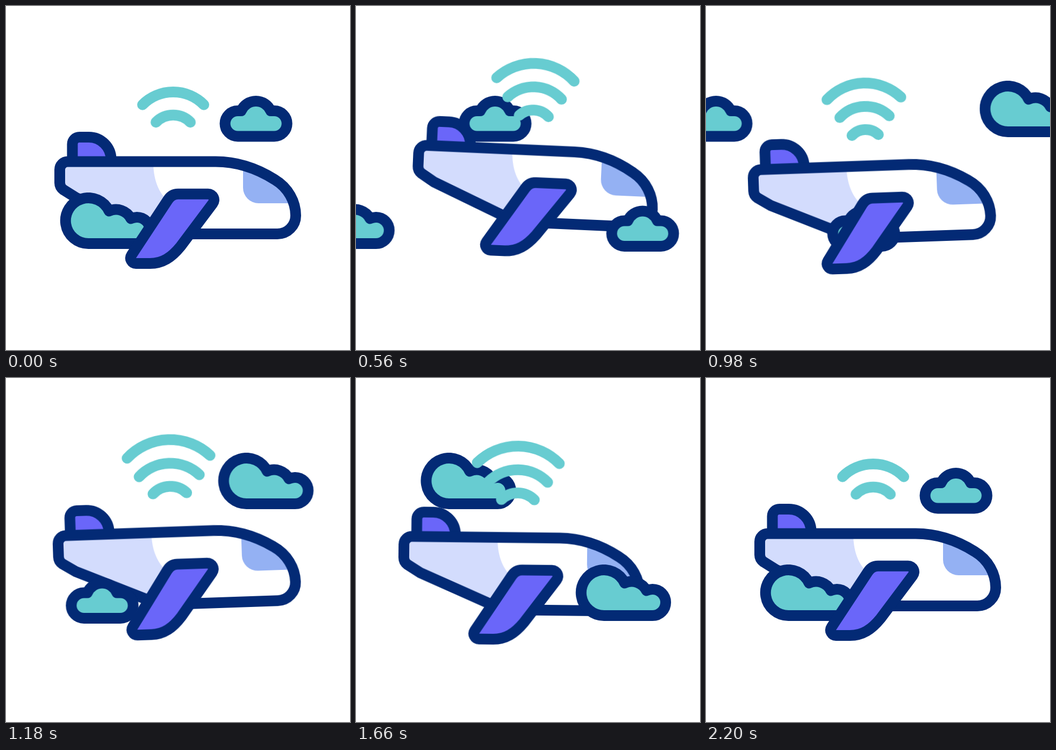
An HTML page that plays this animation: 640 by 640 pixels, repeating every 2.4 s.

```html
<!DOCTYPE html>
<html lang="en">
<head>
<meta charset="utf-8">
<title>In-flight signal</title>
<style>
  html, body { margin: 0; width: 100%; height: 100%; overflow: hidden; background: #fff; }
  svg { display: block; width: 100%; height: 100%; }

  .line { stroke: #032a75; stroke-width: 20; stroke-linejoin: round; }
  .teal { fill: #67ccd1; }
  .purple { fill: #6a66f9; }
  .wave { fill: none; stroke: #67ccd1; stroke-width: 20; stroke-linecap: round; vector-effect: non-scaling-stroke; }

  .drift, .bob, .tilt, .wave { animation: 2400ms linear infinite; }
  .drift { animation-name: drift; }
  .bob, .tilt { animation-timing-function: cubic-bezier(.333, 0, .667, 1); }
  .bob { animation-name: bob; }
  .tilt { animation-name: tilt; transform-origin: 320px 360px; }
  .wave { animation-name: grow; }
  .w0 { --y0: 246px; --y1: 203px; --s0: .3; --s1: .64; animation-name: grow, show; }
  .w1 { --y0: 203px; --y1: 160px; --s0: .64; --s1: 1.14; }
  .w2 { --y0: 160px; --y1: 116px; --s0: 1.14; --s1: 1.56; }

  @keyframes drift {
    0%, 8.333% { transform: translateX(0); }
    91.667%, 100% { transform: translateX(-1143px); }
  }
  @keyframes bob {
    0%, 8.333%, 91.667%, 100% { transform: translate(0, 0); }
    28.333%, 57.083% { transform: translate(16.4px, -25px); }
    35%, 44.167% { transform: translate(-10.4px, 7.7px); }
    69.792%, 76.667% { transform: translate(-11.6px, 7.7px); }
  }
  @keyframes tilt {
    0%, 8.333%, 91.667%, 100% { transform: rotate(0); }
    28.333%, 61.667% { transform: rotate(3deg); }
    45% { transform: rotate(-2.9deg); }
    78.333% { transform: rotate(-2.5deg); }
  }
  /* four pulses of 500 ms, each snapping back to its start */
  @keyframes grow {
    0%, 8.333%, 29.167%, 50%, 70.833%, 91.667%, 100% {
      transform: translate(311px, var(--y0)) scale(var(--s0));
    }
    29.16%, 49.99%, 70.82%, 91.66% {
      transform: translate(311px, var(--y1)) scale(var(--s1));
    }
  }
  @keyframes show {
    0%, 8.34%, 91.66%, 100% { opacity: 0; }
    8.35%, 91.65% { opacity: 1; }
  }
</style>
</head>
<body>
<svg viewBox="0 0 640 640">
  <defs>
    <path id="small" class="line teal" d="M33.75 195H40A30 30 0 0 1 95 195H101.5a23.75 23.75 0 0 1 0 47.5H33.75a23.75 23.75 0 0 1 0-47.5z"/>
    <path id="large" class="line teal" d="M52.5 442A42.5 42.5 0 1 1 90.5 381.5A31 31 0 0 1 131 395.5A28 28 0 0 1 142.3 393a24.5 24.5 0 0 1 0 49z"/>
    <path id="hull" d="M115 289.5H390C435 289.5 470 304 500 323C525 338 539 364 539 390a34 34 0 0 1-34 34H286L131 357L107 342Q100 337 100 329V304.5a15 15 0 0 1 15-15z"/>
  </defs>

  <g class="bob"><g class="tilt">
    <path class="line purple" d="M123.5 290V257a13 13 0 0 1 13-13H154a41.5 41.5 0 0 1 41.5 41.5V290"/>
    <use href="#hull" fill="#fff"/>
    <path fill="#d3dcfd" d="M115 289.5H274C274 322 283 345 300 362L286 424L131 357L107 342Q100 337 100 329V304.5a15 15 0 0 1 15-15z"/>
    <path fill="#94b1f3" d="M441 296V338a29 29 0 0 0 29 29H536C530 348 517 334 500 323C480 310 460 302 441 296z"/>
    <use href="#hull" class="line" fill="none"/>
  </g></g>

  <g class="drift">
    <use href="#small" x="397.5"/>
    <use href="#large" x="956" y="-208"/>
    <use href="#small" x="1540.5"/>
    <use href="#large" x="101.3"/>
    <use href="#small" x="672" y="204.5"/>
    <use href="#large" x="1244.3"/>
  </g>

  <g class="bob"><g class="tilt">
    <path class="line purple" d="M242 479a10 10 0 0 1-8.5-15.5L301 361Q308 349.7 320 349.7H376a11 11 0 0 1 8.7 17.7L325 447C308 468 291 479 268 479z"/>
    <path class="wave w0" d="M-50 20.7A70.7 70.7 0 0 1 50 20.7"/>
    <path class="wave w1" d="M-50 20.7A70.7 70.7 0 0 1 50 20.7"/>
    <path class="wave w2" d="M-50 20.7A70.7 70.7 0 0 1 50 20.7"/>
  </g></g>
</svg>
</body>
</html>
```
